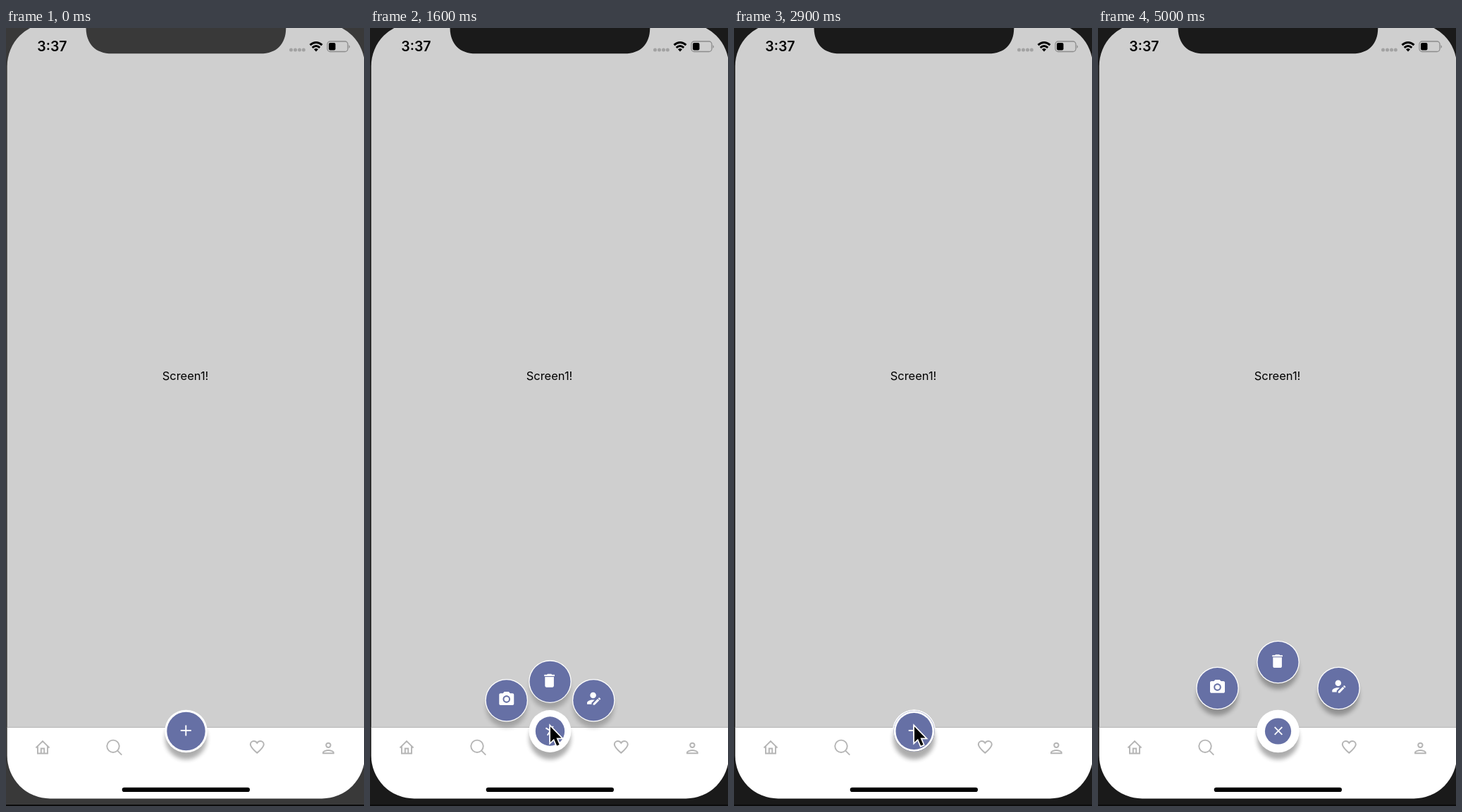
An HTML page for the animation above (5.9 s loop, 508 px wide and 1103 px high).

```html
<!DOCTYPE html>
<html lang="en">
<head>
<meta charset="utf-8">
<title>Tab bar with action menu</title>
<style>
  html, body { margin: 0; width: 100%; height: 100%; overflow: hidden; }
  svg { display: block; width: 508px; height: 1103px; }
  text { font-family: Inter, sans-serif; }
  .tabs { fill: none; stroke: #b5b5b5; stroke-width: 1.9; }
  .blue { fill: #6670a5; }
  .white { fill: #fff; }
  .shadow { fill: #000; filter: url(#blur); }
</style>
</head>
<body>
<svg viewBox="0 0 508 1103">
  <defs>
    <filter id="blur" x="-30%" y="-30%" width="160%" height="160%"><feGaussianBlur stdDeviation="3"/></filter>
    <clipPath id="screen"><rect x="1.700" y="-7" width="507.500" height="1099.500" rx="61"/></clipPath>
    <g id="button">
      <circle class="shadow" cx="255.500" cy="1006.500" r="29"/>
      <circle class="white" cx="255.500" cy="997" r="30.300"/>
      <circle class="blue" cx="255.500" cy="997" r="29"/>
    </g>
  </defs>
  <rect id="bezel" width="508" height="1103"/>
  <rect y="1101" width="508" height="2" fill="#0c0c0c"/>
  <g clip-path="url(#screen)">
    <rect width="510" height="992" fill="#cfcfcf"/>
    <rect y="991" width="510" height="1" fill="#b4b4b4"/>
    <rect y="992" width="510" height="102" fill="#fff"/>
  </g>
  <path id="notch" d="M113.500 0C114 23 127 36.300 150 36.300H361C384 36.300 397 23 397.300 0Z"/>

  <text x="44.300" y="33" font-size="19.500" font-weight="600">3:37</text>
  <g fill="#a2a2a2">
    <circle cx="404.500" cy="31" r="2.500"/><circle cx="410.500" cy="31" r="2.500"/>
    <circle cx="416.500" cy="31" r="2.500"/><circle cx="422.300" cy="31" r="2.500"/>
  </g>
  <g fill="none" stroke="#000" stroke-width="3">
    <path d="M431.500 24.200Q440 16.800 448.500 24.200M434.700 27.800Q440 23.200 445.300 27.800"/>
    <path d="M440 33.500l-3-3.200q3-2.400 6 0Z" fill="#000" stroke="none"/>
  </g>
  <rect x="456" y="19" width="29" height="14.500" rx="4" fill="none" stroke="#8c8c8c" stroke-width="1.300"/>
  <rect x="458" y="21" width="9.500" height="10.500" rx="2"/>
  <path d="M486.500 24v5q3-2.500 0-5" fill="#8c8c8c"/>

  <text x="254.500" y="499" font-size="16.500" text-anchor="middle">Screen1!</text>

  <g class="tabs">
    <path d="M42.500 1020.500L52 1011l9.500 9.500M45 1018.500v10h14v-10M49.800 1028.500v-7h4.400v7"/>
    <circle cx="152" cy="1018.300" r="8.700"/><path d="M158.300 1024.600l6 6"/>
    <path transform="translate(343.700 1006.800) scale(1.05)" d="M12 20C5 14 3 11.500 3 8.500C3 6 5 4 7.500 4C9.200 4 11 5 12 6.500C13 5 14.800 4 16.500 4C19 4 21 6 21 8.500C21 11.500 19 14 12 20Z"/>
    <g transform="translate(444.800 1008.400) scale(1.05)">
      <circle cx="12" cy="8" r="3"/>
      <path d="M5 19v-1c0-2 4.700-3.100 7-3.100s7 1.100 7 3.100v1Z"/>
    </g>
  </g>
  <rect x="164.700" y="1076.700" width="181.300" height="6.300" rx="3.100"/>

  <g id="actions">
    <g>
      <use href="#button"/>
      <g class="white" transform="translate(242.900 982.800) scale(1.05)">
        <path fill-rule="evenodd" d="M9 2L7.170 4H4c-1.100 0-2 .9-2 2v12c0 1.100.9 2 2 2h16c1.100 0 2-.9 2-2V6c0-1.100-.9-2-2-2h-3.170L15 2H9zm3 15c-2.760 0-5-2.240-5-5s2.240-5 5-5 5 2.240 5 5-2.240 5-5 5z"/>
        <circle cx="12" cy="12" r="3.100"/>
      </g>
    </g>
    <g>
      <use href="#button"/>
      <path class="white" transform="translate(242 983) scale(1.05)" d="M6 19c0 1.100.9 2 2 2h8c1.100 0 2-.9 2-2V7H6v12zM19 4h-3.500l-1-1h-5l-1 1H5v2h14V4z"/>
    </g>
    <g>
      <use href="#button"/>
      <path class="white" transform="translate(242 981.200) scale(1.07)" d="M21.700 13.350l-1 1-2.050-2.050 1-1q.38-.38.77 0l1.280 1.280q.38.38 0 .77M12 18.940V21h2.060l6.060-6.120-2.050-2.050L12 18.940M12 14c-4.420 0-8 1.790-8 4v2h6v-1.890l4-4Q13 14 12 14M12 4a4 4 0 0 0 0 8a4 4 0 0 0 0-8Z"/>
    </g>
  </g>

  <circle class="shadow" cx="255.500" cy="1007.500" r="29.500" opacity=".32"/>
  <circle class="white" id="ring" cx="255.500" cy="997"/>
  <circle class="blue" id="disc" cx="255.500" cy="997"/>
  <path id="plus" d="M-7.500 0H7.500M0-7.500V7.500" stroke="#fff" stroke-width="1.900"/>
  <path id="cursor" d="M1.500 2.500V24.500l5-4.800 4.200 9.800 3.400-1.400-4.100-9.600h7Z"
    stroke="#fff" stroke-width="3.400" paint-order="stroke"/>
</svg>
<script>
const LOOP = 5900, STEP = 100;
const $ = id => document.getElementById(id);
const actions = [...$('actions').children];
const offsets = [[-86, -61], [0, -98], [86, -61]];
const buttonShadow = document.querySelector('#button .shadow');
// time, x, y of the pointer tip
const pointer = [
  [100, 14.5, 1024], [200, 110, 1020], [300, 193, 1012], [500, 193, 1012],
  [600, 209, 1004], [700, 229, 995], [800, 242, 989], [1000, 254.5, 988]
];

// Underdamped spring from 0 to 1
function spring(ms) {
  if (ms <= 0) return 0;
  const s = ms / 1000, omega = 20, zeta = 0.8;
  const wd = omega * Math.sqrt(1 - zeta * zeta);
  return 1 - Math.exp(-zeta * omega * s) * (Math.cos(wd * s) + zeta * omega / wd * Math.sin(wd * s));
}

function pointerAt(t) {
  const next = pointer.findIndex(key => key[0] >= t);
  if (next < 0) return pointer.at(-1).slice(1);
  const b = pointer[next], a = pointer[Math.max(0, next - 1)];
  const k = b === a ? 0 : (t - a[0]) / (b[0] - a[0]);
  return [a[1] + (b[1] - a[1]) * k, a[2] + (b[2] - a[2]) * k];
}

function draw(t) {
  const bezel = t < 1400 ? '#393939' : '#1a1a1a';
  $('bezel').setAttribute('fill', bezel);
  $('notch').setAttribute('fill', bezel);

  const open = spring(t - 1493) - spring(t - 2693) + spring(t - 3793);
  const resting = t < 1500 || (t >= 3300 && t < 3700);
  const amount = Math.max(0, Math.min(1, open));
  $('actions').style.display = resting ? 'none' : '';
  buttonShadow.setAttribute('opacity', 0.3 * amount);
  actions.forEach((node, i) => {
    const [x, y] = offsets[i];
    node.setAttribute('transform', `translate(${x * open} ${y * open})`);
  });
  $('ring').setAttribute('r', resting ? 30.3 : 28.8 + 1.5 * amount);
  $('disc').setAttribute('r', resting ? 27.2 : 26 - 7.4 * amount);
  $('plus').setAttribute('transform', `translate(${255.3 + 0.7 * amount} ${996 + 0.5 * amount}) rotate(${45 * open})`);

  const [x, y] = pointerAt(t);
  $('cursor').setAttribute('transform', `translate(${x} ${y})`);
  $('cursor').setAttribute('opacity', t < 100 || t >= 5000 ? 0 : t >= 4900 ? 0.5 : 1);
}

function tick() {
  draw(Math.floor(performance.now() % LOOP / STEP) * STEP);
  requestAnimationFrame(tick);
}
tick();
</script>
</body>
</html>
```
